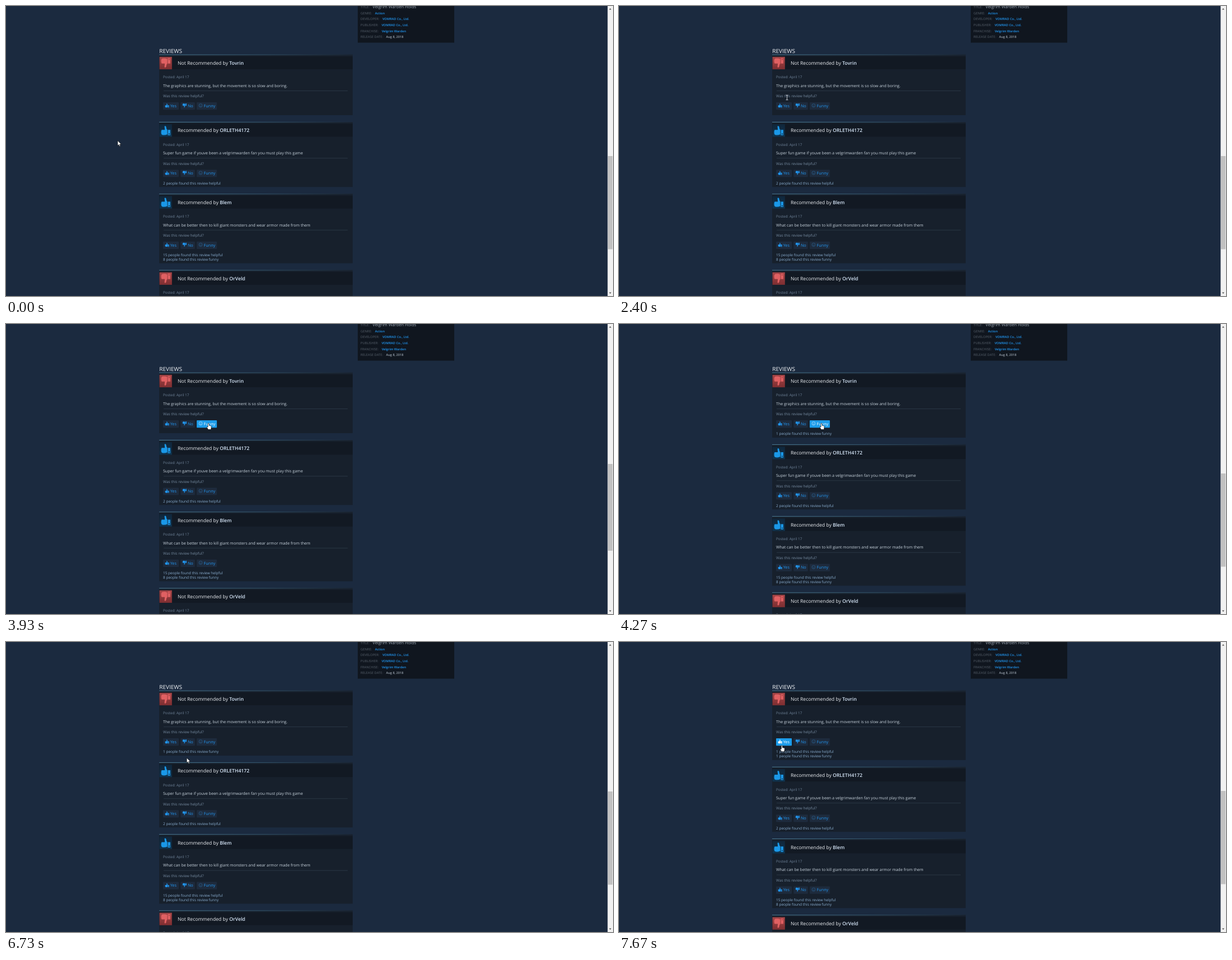
An HTML page for the animation above (8000 ms loop, 1082x518 px).

```html
<!DOCTYPE html>
<html lang="en">
<head>
<meta charset="utf-8">
<title>Reviews</title>
<style>
  html, body { margin: 0; height: 100%; overflow: hidden; background: #1b2a3f; }
  svg { display: block; width: 100vw; height: 100vh; }
  text { font-family: "Open Sans", "Noto Sans", sans-serif; text-rendering: geometricPrecision; }
</style>
</head>
<body>
<svg viewBox="0 0 1082 518">
  <defs>
    <linearGradient id="edge">
      <stop offset="0" stop-color="#4d7f9a"/>
      <stop offset=".55" stop-color="#34566e"/>
      <stop offset="1" stop-color="#1b2736"/>
    </linearGradient>
    <linearGradient id="red" x2="0" y2="1">
      <stop offset="0" stop-color="#a54547"/>
      <stop offset="1" stop-color="#7d2e31"/>
    </linearGradient>
    <linearGradient id="blue" x2="0" y2="1">
      <stop offset="0" stop-color="#10263a"/>
      <stop offset="1" stop-color="#0f3450"/>
    </linearGradient>
    <g id="thumb">
      <path d="M9 3.6Q11 2 12 4.6Q12 8 14 10V18Q10 20 5 19Q3 18 3 15Q3 11 4 10H9.6Z"/>
      <path fill-rule="evenodd" d="M15 10H19.4V19.6H15ZM16.5 16.4V18.2H18.2V16.4Z"/>
    </g>
    <g id="smile" fill="none" stroke-width=".7">
      <circle r="3.1"/>
      <path d="M-1.6 .8Q0 2.4 1.6 .8M-1.1-1.3V-.5M1.1-1.3V-.5"/>
    </g>
    <g stroke="#000" stroke-width=".6" fill="#fff">
      <path id="arrow" fill="#fff" stroke="#000" stroke-width=".6" d="M0 0V9L2 7 3.5 10.4 5 9.8 3.6 6.6H6.4Z"/>
      <path id="hand" fill="#fff" stroke="#000" stroke-width=".6" d="M-1 1Q0-.6 1 1V4.3L4.4 5Q5.4 5.6 5 7L4.4 11.5H-.5L-3 7.6Q-3 6-1 7Z"/>
    </g>
    <path id="beam" fill="none" stroke="#d5dae0" stroke-width=".9" d="M-2-4.2H2M0-4.2V4.2M-2 4.2H2"/>
  </defs>
  <g id="page"></g>
</svg>
<script>
const page = document.getElementById('page');
const LOOP = 8000;
const STEP = 200 / 3;   // the picture advances 15 times a second
const LINE = 7.9;       // height of one vote count line
const LINK = '#2196f0';

const reviews = [
  { name: 'Tovrin', body: 'The graphics are stunning, but the movement is so slow and boring.' },
  { name: 'ORLETH4172', good: true, helpful: 2, body: 'Super fun game if youve been a velgrimwarden fan you must play this game' },
  { name: 'Blem', good: true, helpful: 15, funny: 8, body: 'What can be better then to kill giant monsters and wear armor made from them' },
  { name: 'OrVeld', body: '' }
];

const facts = {
  'TITLE:': 'Velgrim Warden Holds',
  'GENRE:': 'Action',
  'DEVELOPER:': 'VOMRAD Co., Ltd.',
  'PUBLISHER:': 'VOMRAD Co., Ltd.',
  'FRANCHISE:': 'Velgrim Warden',
  'RELEASE DATE:': 'Aug 8, 2018'
};

// Each click shows a taller page while loading, then adds one vote
const clicks = [3930, 7330];
const LOADING = 330;

const start = { x: 199, y: 240.5 };
const moves = [
  { from: 333, to: 667, x: 196.5, y: 242 },
  { from: 1533, to: 2400, x: 299.5, y: 163.5 },
  { from: 2467, to: 3000, x: 350, y: 161 },
  { from: 3133, to: 3600, x: 361, y: 177 },
  { from: 5133, to: 5733, x: 365, y: 198 },
  { from: 5733, to: 6200, x: 324.7, y: 208.7 },
  { from: 6667, to: 7067, x: 290.3, y: 184.3 }
];

let nextX = 280;
const buttons = Object.entries({ Yes: 28, No: 25.5, Funny: 36 }).map(([label, w]) => {
  const x = nextX;
  nextX += w + 3.2;
  return { label, x, w };
});

const rect = (x, y, w, h, fill, rx = 0) =>
  `<rect x="${x}" y="${y}" width="${w}" height="${h}" fill="${fill}" rx="${rx}"/>`;
const text = (x, y, size, fill, str, weight = 400) =>
  `<text x="${x}" y="${y}" font-size="${size}" fill="${fill}" font-weight="${weight}">${str}</text>`;
const thumb = (x, y, scale, fill, up) =>
  `<use href="#thumb" fill="${fill}" transform="translate(${x} ${up ? y : y + 22 * scale}) scale(${scale} ${up ? scale : -scale})"/>`;

function pointerAt(ms) {
  let { x, y } = start;
  for (const move of moves) {
    const u = Math.min(1, Math.max(0, (ms - move.from) / (move.to - move.from)));
    const eased = u * u * (3 - 2 * u);
    x += (move.x - x) * eased;
    y += (move.y - y) * eased;
  }
  return { x, y };
}

function button({ label, x, w }, y, hover) {
  const ink = hover ? '#fff' : LINK;
  const icon = label === 'Funny'
    ? `<use href="#smile" stroke="${hover ? '#b5e0ff' : '#2a5f8d'}" x="${x + 7}" y="${y + 5.7}"/>`
    : thumb(x + 2.3, y + 1, .43, ink, label === 'Yes');
  return rect(x, y, w, 13.2, hover ? '#1c9cea' : '#1e2b3d', 1) + icon
    + text(x + 12.7, y + 8.8, 7.2, ink, label, 500);
}

function card({ name, good, body }, y, counts, hovered) {
  const verdict = good ? 'Recommended' : 'Not Recommended';
  return rect(273, y, 345, 108.4 + LINE * counts.length, '#17202c')
    + rect(273, y + 3.4, 345, 23, '#121923')
    + rect(273, y, 345, 1, 'url(#edge)')
    + rect(273.5, y + 4.2, 22.3, 22.3, good ? 'url(#blue)' : 'url(#red)')
    + thumb(273.5, y + 4.2, 1, good ? '#1a98e8' : '#e06062', good)
    + text(306, y + 18.4, 8.65, '#eceff3', `${verdict} by <tspan font-weight="600" fill="#d8e8fa">${name}</tspan>`)
    + text(280, y + 42.8, 6.35, '#70849a', 'Posted: April 17')
    + text(280, y + 58.2, 7.05, '#c8d3dd', body)
    + rect(281, y + 64.5, 328, .8, '#2e3c4a')
    + text(280, y + 76.6, 6.54, '#768ba1', 'Was this review helpful?')
    + buttons.map(b => button(b, y + 85.4, b === hovered)).join('')
    + counts.map((c, i) => text(280, y + 111.7 + LINE * i, 6.5, '#8aaed0', c)).join('');
}

function sidePanel() {
  const rows = Object.entries(facts).map(([label, value], i) => {
    const title = i === 0, date = label.startsWith('RELEASE');
    const fill = title || date ? '#98a3ae' : LINK;
    const style = `dx="5.5" fill="${fill}" font-size="${title ? 7.5 : 5.65}" font-weight="${title ? 400 : 600}"`;
    return text(632, 3.8 + 10.7 * i, 5.8, '#57616c', `${label}<tspan ${style}>${value}</tspan>`);
  });
  return rect(627, 0, 172, 65.5, '#10161f') + rows.join('');
}

function scrollbar(loading, votes) {
  const [top, height] = loading ? [250 - 2 * votes, 155] : [268 - votes, 166.5];
  return rect(1072.4, 0, 9.6, 518, '#f1f1f1')
    + rect(1073, top, 8.2, height, '#c1c1c1')
    + '<path fill="#505050" d="M1075 6.5L1077 4L1079 6.5ZM1075 511.5L1077 514L1079 511.5Z"/>';
}

function draw(ms) {
  const { x, y } = pointerAt(ms);
  const votes = clicks.filter(c => ms >= c + LOADING).length;
  const loading = clicks.some(c => ms >= c && ms < c + LOADING);
  const live = { ...reviews[0], funny: votes > 0 ? 1 : 0, helpful: votes > 1 ? 1 : 0 };

  const target = buttons.find(b => x >= b.x && x <= b.x + b.w && y >= 172 && y <= 185.2);
  const onQuestion = x >= 280 && x < 354 && y > 156 && y < 167;
  const onCount = votes > 0 && x >= 280 && x < 380 && y > 192 && y < 200;
  const shape = target ? 'hand' : onQuestion || onCount ? 'beam' : 'arrow';

  let top = 86.6;
  let out = text(273.3, 84, 10, '#f0f2f5', 'REVIEWS') + sidePanel();
  for (const review of [live, ...reviews.slice(1)]) {
    const counts = ['helpful', 'funny'].filter(kind => review[kind])
      .map(kind => `${review[kind]} people found this review ${kind}`);
    out += card(review, top, counts, review === live ? target : null);
    top += 120.4 + LINE * counts.length;
  }
  page.innerHTML = out + scrollbar(loading, votes) + `<use href="#${shape}" x="${x}" y="${y}"/>`;
}

let shown = -1;
function tick() {
  const step = Math.floor(performance.now() % LOOP / STEP + .075);
  if (step !== shown) {
    shown = step;
    draw(step * STEP % LOOP);
  }
  requestAnimationFrame(tick);
}
tick();
</script>
</body>
</html>
```
